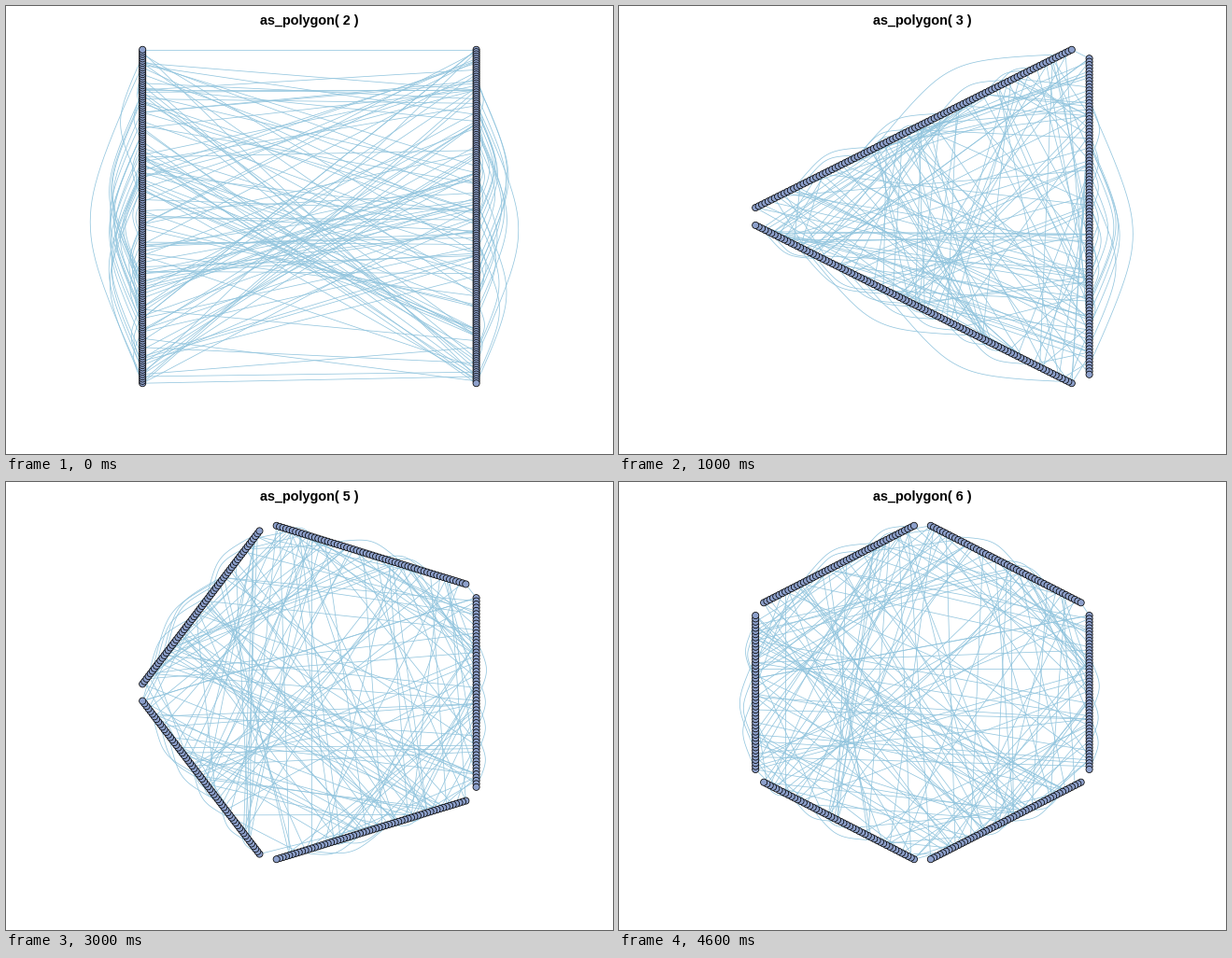
These frames come from a looping animation (650x480 px, 5 s). A matplotlib script:

```python
import random

import matplotlib.pyplot as plt
import numpy as np
from matplotlib.animation import FuncAnimation
from matplotlib.collections import LineCollection

W, H, DPI = 650, 480, 100
PX = 72 / DPI
NODES, EDGES = 300, 210
SIDES = range(2, 7)
CENTER, HALF = np.array([324.9, 225.5]), 178.7
NODE_FILL, EDGE_COLOR = "#8da0cb", "#92c5de"

# The widest links set the outline; all others are random
WIDE_LINKS = [(0, 299), (24, 137), (152, 292), (14, 96), (237, 296), (85, 147)]
MAX_REACH = 0.6


def side_of(i, n):
    return i * n // NODES


def same_side(a, b, n):
    return side_of(a, n) == side_of(b, n)


def allowed(a, b):
    """No link may span too much of a side in any polygon."""
    return not any(same_side(a, b, n) and b - a > MAX_REACH * NODES / n
                   for n in SIDES)


def make_links(seed=5):
    rng = random.Random(seed)
    links = list(WIDE_LINKS)
    while len(links) < EDGES:
        a, b = sorted(rng.sample(range(NODES), 2))
        if allowed(a, b):
            links.append((a, b))
    return links


def polygon(n):
    """Node positions along n sides, clockwise from the right-hand side."""
    per = NODES // n
    apothem = max(np.cos(np.pi / n), 0.1)
    reach = 0.9 * np.sin(np.pi / n)
    theta = np.repeat(2 * np.pi * np.arange(n) / n, per)
    t = np.tile(np.linspace(-reach, reach, per), n)
    c, s = np.cos(theta), np.sin(theta)
    pts = np.column_stack([apothem * c - t * s, apothem * s + t * c])
    low, high = pts.min(axis=0), pts.max(axis=0)
    return CENTER + HALF * (2 * (pts - low) / (high - low) - 1)


def blend(u, p):
    return u**3 * (10 - p + (2 * p - 15) * u + (6 - p) * u**2)


def spline_weights(steps=41):
    """X-spline weights for three control points, the middle one smooth."""
    t = np.linspace(0, 2, steps)
    w = np.column_stack([blend(1 - t / 2, 8),
                         blend(np.minimum(t, 2 - t), 2),
                         blend(t / 2, 8)])
    return w / w.sum(axis=1, keepdims=True)


LINKS = make_links()
WEIGHTS = spline_weights()


def link_path(pts, a, b, n):
    """Straight between sides, bowed outwards within one side."""
    p, q = pts[a], pts[b]
    if not same_side(a, b, n):
        return np.array([p, q])
    dx, dy = q - p
    mid = (p + q) / 2 + 0.25 * np.array([dy, -dx])
    return WEIGHTS @ np.array([p, mid, q])


fig = plt.figure(figsize=(W / DPI, H / DPI), dpi=DPI, facecolor="white")
ax = fig.add_axes([0, 0, 1, 1])
ax.set(xlim=(0, W), ylim=(H, 0))
ax.axis("off")

title = ax.text(325, 20, "", ha="center", va="baseline", zorder=1,
                family="Liberation Sans", weight="bold", size=14.4 * PX)
edges = LineCollection([], colors=EDGE_COLOR, linewidths=0.75 * PX, zorder=2)
ax.add_collection(edges)
# One colour per node keeps the circles at sub-pixel positions
dots = ax.scatter(np.zeros(NODES), np.zeros(NODES), s=(7.15 * PX) ** 2,
                  facecolors=[NODE_FILL] * NODES, edgecolors="black",
                  linewidths=0.75 * PX, zorder=3)


def draw(frame):
    n = SIDES[frame]
    pts = polygon(n)
    title.set_text(f"as_polygon( {n} )")
    edges.set_segments([link_path(pts, a, b, n) for a, b in LINKS])
    dots.set_offsets(pts)
    return title, edges, dots


anim = FuncAnimation(fig, draw, frames=len(SIDES), interval=1000, repeat=True)
plt.show()
```
